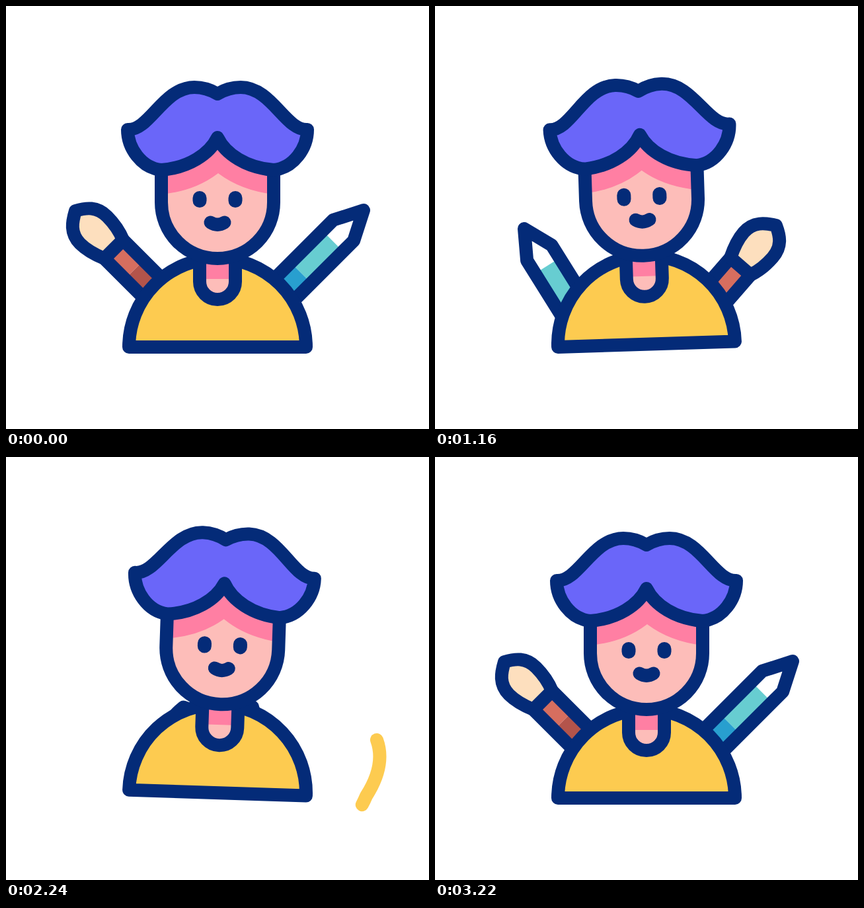
An HTML page for the animation above (3360 ms loop, 640 px wide and 640 px high).

```html
<!DOCTYPE html>
<html lang="en">
<head>
<meta charset="utf-8">
<title>Artist</title>
<style>
html, body { margin: 0; width: 100%; height: 100%; overflow: hidden; background: #fff; }
svg { display: block; width: 100vw; height: 100vh; }
.line { fill: none; stroke: #042b78; }
.yellow { fill: none; stroke: #fdcb50; }
</style>
</head>
<body>
<svg viewBox="0 0 640 640" stroke-width="20" stroke-linecap="round" stroke-linejoin="round">
  <clipPath id="above"><path d="M0 0H640V500H0Z"/></clipPath>
  <g class="yellow">
    <path id="leftTrail" pathLength="1" d="M110 430C95 680 196 578 266 541L330 508"/>
    <path id="rightTrail" pathLength="1" d="M330 530C350 650 500 620 545 513C561 488 572 458 561 428"/>
  </g>
  <g id="sparks" class="yellow"></g>
  <g clip-path="url(#above)">
    <g id="brush">
      <path fill="#d66e5f" d="M-20 82H20V126H-20Z"/>
      <path fill="#b3544b" d="M-20 126H20V195H-20Z"/>
      <path class="line" d="M-20 82V195H20V82"/>
      <path class="line" style="fill:#fddfbe" d="M0 0C15 8 28 18 28 40C28 56 25 70 20 82H-20C-25 70 -30 56 -30 40C-30 18 -15 8 0 0Z"/>
    </g>
    <g id="pencil">
      <path fill="#fff" d="M0 0L22 43V66H-22V43Z"/>
      <path fill="#67cdd1" d="M-22 66H22V134H-22Z"/>
      <path fill="#289fcf" d="M-22 134H22V195H-22Z"/>
      <path class="line" d="M0 0L22 43V195H-22V43Z"/>
    </g>
  </g>
  <g id="body">
    <path class="line" style="fill:#fdcb50" d="M186 516A134 134 0 0 1 454 516Z"/>
    <path fill="#fdbdb9" d="M293 375V417A27 27 0 0 0 347 417V375Z"/>
    <path fill="#ff7fa3" d="M293 375H347V413H293Z"/>
    <path class="line" d="M293 380V417A27 27 0 0 0 347 417V380"/>
    <g id="head">
      <path fill="#fdbdb9" d="M235 240V297A85 85 0 0 0 405 297V240L320 195Z"/>
      <path fill="#ff7fa3" d="M235 230L320 195L405 230V285Q355 279 321 253Q286 280 235 285Z"/>
      <path class="line" d="M235 240V297A85 85 0 0 0 405 297V240"/>
      <path class="line" style="fill:#6a66f9" d="M184 187C217 189 238 123 285 123C300 123 310 127 320 133C330 127 340 123 355 123C402 123 423 189 456 187C456 215 435 245 405 248C364 245 332 224 320 199C308 224 276 245 235 248C205 245 184 215 184 187Z"/>
      <path id="eyes" class="line" stroke-width="21"/>
      <path class="line" d="M309.5 327.5Q320 334 330.5 327.5"/>
    </g>
  </g>
</svg>
<script>
const $ = id => document.getElementById(id);
const LOOP = 3360, START = 200, SWING = 2600, SPARK = 440;

// Tip position and turn of each tool
const HIDDEN = [320, 400, 0];
const tools = {
  brush: { rest: [105, 310, -45], held: [516, 332, 41] },
  pencil: { rest: [541, 309, 45], held: [135, 337, -32] }
};
const bursts = [
  { start: 1200, x: 151, y: 353, aim: -41, fan: 42, reach: 100 },
  { start: 1200, x: 500, y: 363, aim: 47, fan: 42, reach: 100 },
  { start: 2780, x: 131, y: 339, aim: -33, fan: 53, reach: 90 },
  { start: 2780, x: 521, y: 318, aim: 48, fan: 53, reach: 90 }
];

const smooth = p => (p = Math.min(1, Math.max(0, p)), p * p * (3 - 2 * p));
const ramp = (t, a, b) => smooth((t - a) / (b - a));
const wave = cycles => Math.sin(2 * Math.PI * cycles);
const set = (id, name, value) => $(id).setAttribute(name, value);

function drawPerson(t) {
  const p = (t - START) / SWING;
  const turn = p > 0 && p < 1 ? -1.9 * wave(3.5 * p) : 0;
  const lively = ramp(t, 200, 360) - ramp(t, 2280, 2640);
  const bob = -13.5 * lively * wave((t - 320) / 800);
  const eye = 4 + lively * (4 + .45 * bob), top = 292.5 - eye / 2;
  set("body", "transform", `translate(0 ${bob}) rotate(${turn} 320 516)`);
  set("head", "transform", `rotate(${-.45 * Math.max(0, bob)} 320 333)`);
  set("eyes", "d", `M293 ${top}v${eye}M347 ${top}v${eye}`);
}

// Tools leave along a sagging path, swap sides behind the body and come straight out
function drawTools(t) {
  const spot = t < 650 || t > 2020 ? "rest" : "held";
  const leaving = t < 650 || (t > 1400 && t < 2020);
  const out = t < 650 ? 1 - ramp(t, 200, 520)
    : t < 1400 ? ramp(t, 780, 1150)
    : t < 2020 ? 1 - ramp(t, 1500, 1990)
    : ramp(t, 2050, 2650);
  const sag = leaving ? 40 * wave(out / 2) : 0;
  for (const id in tools) {
    const [x, y, turn] = HIDDEN.map((v, i) => v + (tools[id][spot][i] - v) * out);
    set(id, "transform", `translate(${x} ${y + sag}) rotate(${turn})`);
  }
}

function drawTrail(id, tip, tail) {
  $(id).style.display = tip - tail > .001 ? "" : "none";
  set(id, "stroke-dasharray", `${Math.max(0, tip - tail)} 2`);
  set(id, "stroke-dashoffset", -tail);
}

const rays = bursts.flatMap(({ start, x, y, aim, fan, reach }) => [-1, 0, 1].map(side => {
  const el = document.createElementNS("http://www.w3.org/2000/svg", "path");
  el.setAttribute("transform", `translate(${x} ${y}) rotate(${aim + side * fan})`);
  $("sparks").append(el);
  return { el, start, reach };
}));

function drawSparks(t) {
  for (const { el, start, reach } of rays) {
    const p = (t - start) / SPARK, at = q => -36 - (reach - 36) * smooth(q);
    el.style.display = p > 0 && p < 1 ? "" : "none";
    el.setAttribute("d", `M0 ${at(p)}V${at(p * 1.6) - .01}`);
  }
}

const begin = performance.now();
function frame() {
  const t = (performance.now() - begin) % LOOP;
  drawPerson(t);
  drawTools(t);
  drawTrail("leftTrail", ramp(t, 460, 680), ramp(t, 560, 840));
  drawTrail("rightTrail", ramp(t, 1960, 2200), ramp(t, 2050, 2340));
  drawSparks(t);
  requestAnimationFrame(frame);
}
frame();
</script>
</body>
</html>
```
